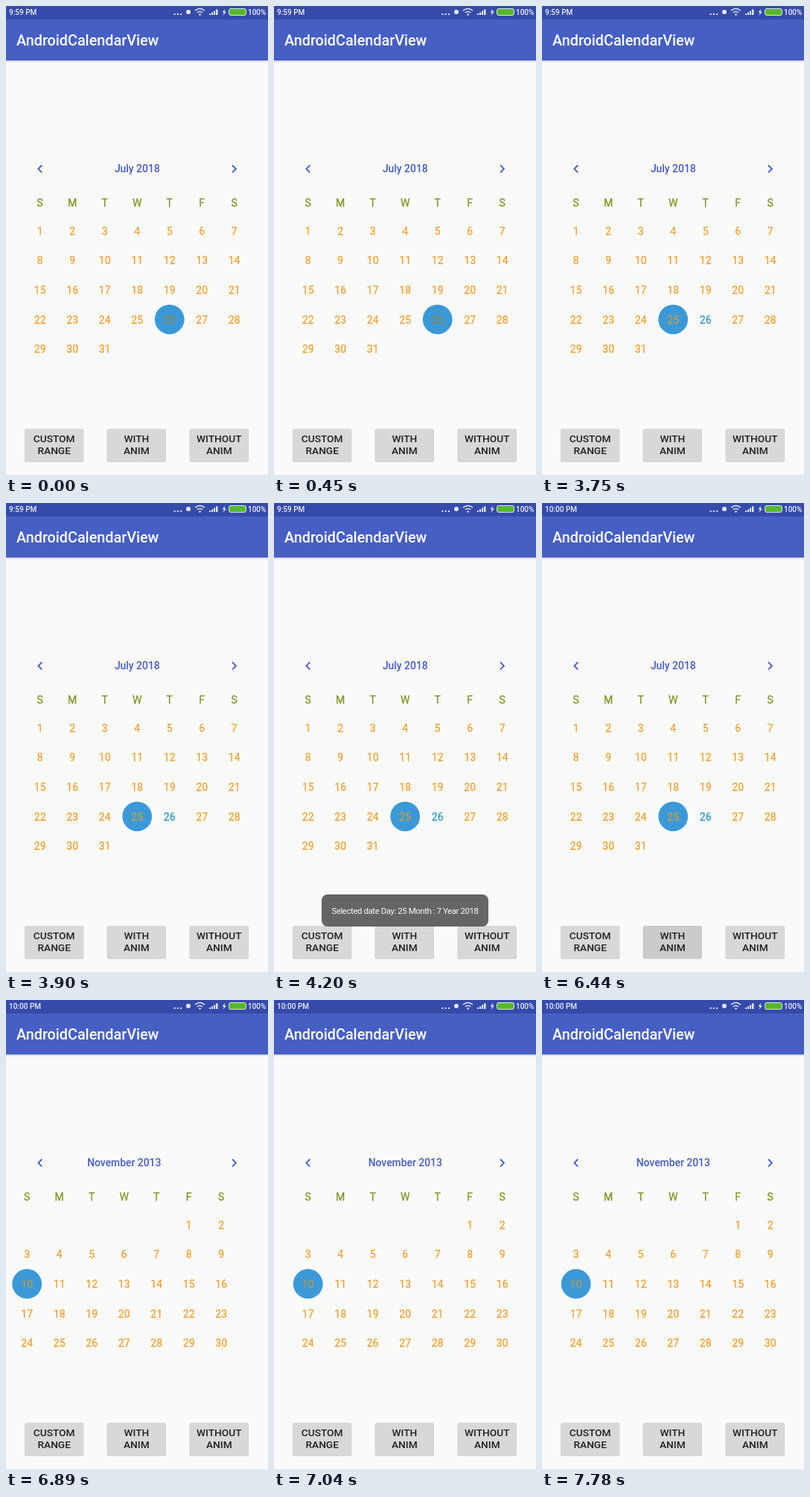
An HTML page for the animation above (8 s loop, 352 by 629 pixels).

```html
<!DOCTYPE html>
<html lang="en">
<head>
<meta charset="utf-8">
<title>Calendar</title>
<style>
  html, body { margin: 0; width: 100%; height: 100%; overflow: hidden; background: #fafafa; }
  svg { display: block; width: 100vw; height: 100vh; font-family: Roboto, sans-serif; }
  .mid { text-anchor: middle; }
  .status { font-size: 10px; font-weight: 500; fill: #eef0fa; }
  .app { font-size: 19.8px; font-weight: 500; fill: #fff; }
  .title { font-size: 13.9px; font-weight: 500; fill: #465bc0; }
  .week, .day { font-size: 14px; fill: currentColor; stroke: currentColor; stroke-width: .25px; }
  .week { color: #7c9424; }
  .day { color: #f0a032; }
  .label { font-size: 13.7px; font-weight: 500; fill: #212121; }
  .note { font-size: 11.5px; letter-spacing: -.45px; fill: #f7f7f7; }
</style>
</head>
<body>
<svg id="stage" viewBox="0 0 352 629">
  <defs>
    <linearGradient id="shade" x2="0" y2="1">
      <stop offset="0" stop-color="#c8cad3"/>
      <stop offset="1" stop-color="#fafafa"/>
    </linearGradient>
  </defs>
  <rect width="352" height="629" fill="#fafafa"/>
  <rect y="73" width="352" height="3" fill="url(#shade)"/>
  <rect width="352" height="73" fill="#465fc2"/>
  <rect width="352" height="18" fill="#354aa9"/>
  <text class="status" id="clock" x="4" y="11.7"></text>
  <text class="status" x="325" y="11.7">100%</text>
  <text class="app" x="14" y="53">AndroidCalendarView</text>

  <g fill="#e3e6f5">
    <path d="M225.5 10h2v2h-2zM229.8 10h2v2h-2zM234.1 10h2v2h-2z"/>
    <circle cx="245" cy="8" r="3"/>
    <path d="M273 12V10h2v2zM276 12V8.500h2V12zM279 12V6.500h2V12zM282 12V4.500h2.500V12z"/>
    <path d="M294.500 3.500l-4 5h2.500l-1.500 4.500 4.500-5.500h-2.700z"/>
    <circle cx="260.500" cy="11.500" r="1.300"/>
  </g>
  <path d="M254 6.200q6.500-5.400 13 0M256.700 9q3.800-3.200 7.600 0" fill="none" stroke="#e3e6f5" stroke-width="1.400"/>
  <rect x="299.500" y="3.500" width="23" height="9" rx="2.500" fill="#58b92c" stroke="#d7dfef"/>

  <path d="M48.300 213.500l-4.900 4.900 4.900 4.900M304 213.500l4.900 4.900-4.900 4.900"
        fill="none" stroke="#4a60c1" stroke-width="1.900"/>
  <g id="pages"></g>
  <g id="buttons"></g>
  <g id="toast">
    <rect x="64" y="525" width="224" height="43" rx="8" fill="#656565"/>
    <text class="note" x="77.500" y="551">Selected date Day: 25 Month : 7 Year 2018</text>
  </g>
</svg>
<script>
const LOOP = 8000;
const byId = id => document.getElementById(id);

function add(parent, tag, attrs, text) {
  const node = document.createElementNS('http://www.w3.org/2000/svg', tag);
  for (const key in attrs) node.setAttribute(key, attrs[key]);
  if (text !== undefined) node.textContent = text;
  return parent.appendChild(node);
}

const colX = col => 45.7 + 43.5 * col;
const rowY = row => 301.5 + 39.6 * row;

function buildMonth(name, first, count, chosen, chosenColor, today) {
  const page = add(byId('pages'), 'g', {});
  add(page, 'text', { class: 'title mid', x: 176.3, y: 223.4 }, name);
  [...'SMTWTFS'].forEach((letter, col) =>
    add(page, 'text', { class: 'week mid', x: colX(col), y: 269.3 }, letter));
  const grid = add(page, 'g', {});
  for (let day = 1; day <= count; day++) {
    const cell = first + day - 1;
    const x = colX(cell % 7), y = rowY(Math.floor(cell / 7));
    if (day === chosen) add(grid, 'circle', { cx: x, cy: y, r: 19.9, fill: '#3c99d8' });
    const label = add(grid, 'text', { class: 'day mid', x, y: y + 5.3 }, day);
    if (day === chosen) label.style.color = chosenColor;
    else if (day === today) label.style.color = '#3295c4';
  }
  return { page, grid };
}

function buildButton(x, top, bottom) {
  const group = add(byId('buttons'), 'g', {});
  add(group, 'rect', { x: x - 39.7, y: 567.5, width: 79.4, height: 43.9, rx: 2, fill: '#cbcbcb' });
  const face = add(group, 'rect', { x: x - 39.4, y: 567, width: 78.8, height: 43.6, rx: 2, fill: '#d8d8d8' });
  add(group, 'text', { class: 'label mid', x, y: 585 }, top);
  add(group, 'text', { class: 'label mid', x, y: 601 }, bottom);
  return face;
}

const months = {
  before: buildMonth('July 2018', 0, 31, 26, '#8c8650', 26),
  picked: buildMonth('July 2018', 0, 31, 25, '#cb9d48', 26),
  jumped: buildMonth('November 2013', 5, 30, 10, '#b8994c')
};
buildButton(64.7, 'CUSTOM', 'RANGE');
const animFace = buildButton(175.3, 'WITH', 'ANIM');
buildButton(286.3, 'WITHOUT', 'ANIM');

// Each step changes only the listed values and holds until the next one.
const steps = [
  { at: 0, month: 'before', shift: 0, grid: true, toast: 0, clock: '9:59 PM', face: '#d8d8d8' },
  { at: 3750, month: 'picked' },
  { at: 4050, toast: .5 },
  { at: 4200, toast: 1 },
  { at: 5850, toast: .42 },
  { at: 5990, toast: 0 },
  { at: 6440, clock: '10:00 PM', face: '#cbcbcb' },
  { at: 6590, month: 'jumped', grid: false, face: '#d2d2d2' },
  { at: 6740, grid: true, shift: -23, face: '#d8d8d8' },
  { at: 6890, shift: -17.5 },
  { at: 7040, shift: 0 }
];

function draw(time) {
  const state = Object.assign({}, ...steps.filter(step => step.at <= time));
  for (const name in months) {
    const { page, grid } = months[name];
    page.style.display = name === state.month ? '' : 'none';
    page.setAttribute('transform', `translate(${state.shift})`);
    grid.style.display = state.grid ? '' : 'none';
  }
  byId('toast').style.opacity = state.toast;
  byId('clock').textContent = state.clock;
  animFace.setAttribute('fill', state.face);
}

const start = performance.now();
function tick() {
  draw((performance.now() - start) % LOOP);
  requestAnimationFrame(tick);
}
tick();
</script>
</body>
</html>
```
